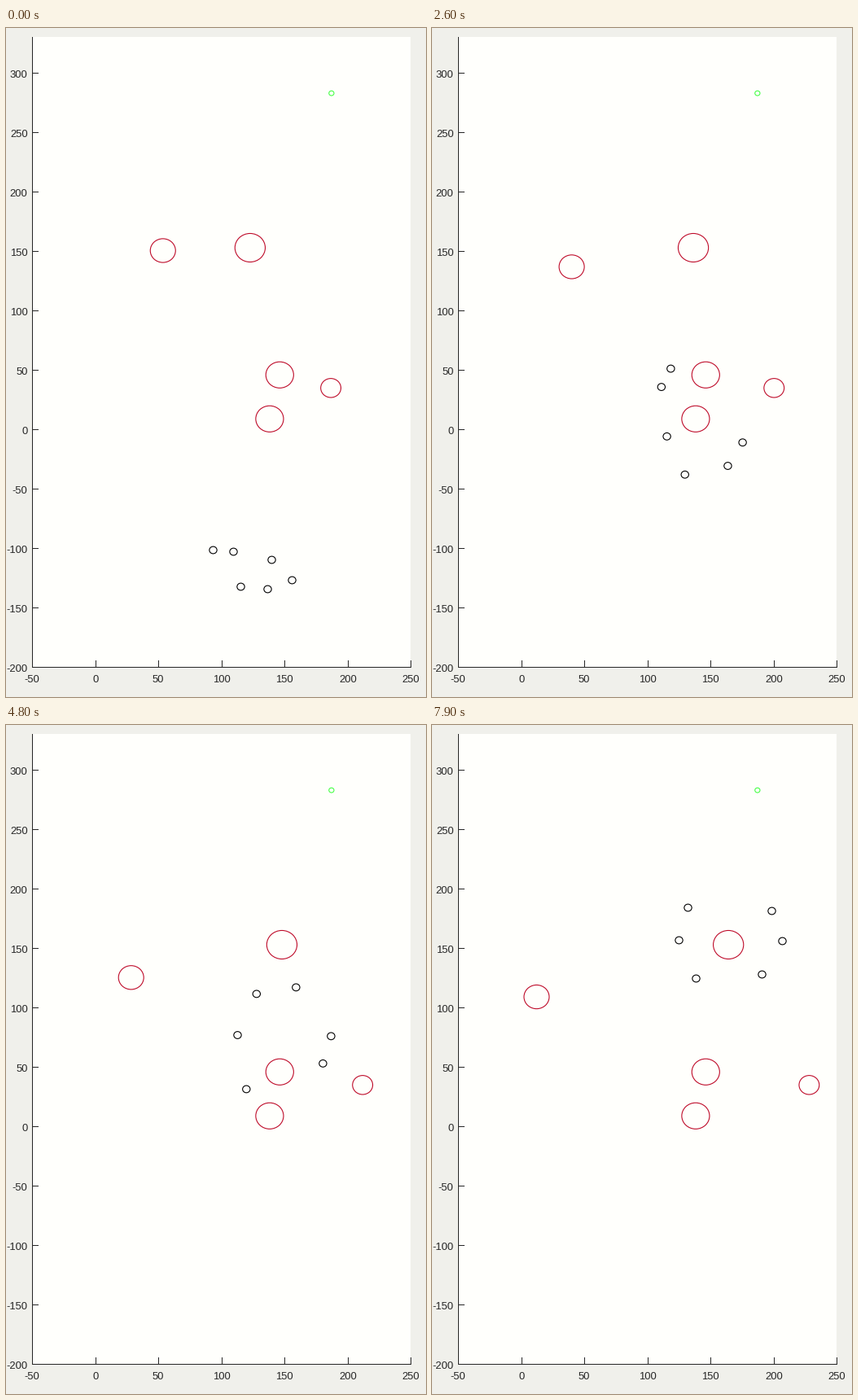
Write a matplotlib script that moves like this. It is 516 by 822 pixels and loops after 8 s.

```python
import matplotlib.pyplot as plt
import numpy as np
from matplotlib.animation import FuncAnimation
from matplotlib.patches import Ellipse, Rectangle

W, H, DPI = 516, 822, 100
FRAMES, STEP = 80, 100
PX = 72 / DPI
LEFT, TOP, WIDTH, HEIGHT = 32, 11, 465, 774
BOTTOM = TOP + HEIGHT
SCALE = np.array([WIDTH / 300, HEIGHT / 530])
INK, RED, GREEN = "#262626", "#be0a28", "#46ff46"

plt.rcParams["font.family"] = "Liberation Sans"
fig = plt.figure(figsize=(W / DPI, H / DPI), dpi=DPI, facecolor="#f0f0eb")
ax = fig.add_axes([0, 0, 1, 1])
ax.set(xlim=(0, W), ylim=(H, 0))
ax.axis("off")


def to_px(x, y):
    return np.array([LEFT + 0.5 + (x + 50) * SCALE[0],
                     BOTTOM + 0.5 - (y + 200) * SCALE[1]])


def bar(x, y, w, h):
    """Crisp axis line made of whole pixels."""
    ax.add_patch(Rectangle((x, y), w, h, fc=INK, ec="none",
                           antialiased=False, zorder=2))


def label(x, y, value, ha):
    ax.text(x, y, str(value), size=13 * PX, color=INK,
            ha=ha, va="center_baseline")


def ring(center, r, color):
    return ax.add_patch(Ellipse(center, *(2 * r * SCALE), fill=False,
                                ec=color, lw=1.1 * PX, zorder=3))


# Plot area, axis lines, ticks and labels
ax.add_patch(Rectangle((LEFT, TOP), WIDTH, HEIGHT, fc="#fffffc", ec="none"))
bar(LEFT, TOP, 1, HEIGHT + 1)
bar(LEFT, BOTTOM, WIDTH + 1, 1)
for v in range(-200, 301, 50):
    y = int(to_px(0, v)[1])
    bar(LEFT, y, 8, 1)
    label(26.5, y + 1.5, v, "right")
for v in range(-50, 251, 50):
    x = int(to_px(v, 0)[0])
    bar(x, BOTTOM - 8, 1, 8)
    label(x, BOTTOM + 14.5, v, "center")

# Obstacles drift at one speed: x, y, radius, direction
SPEED = 0.525
OBSTACLES = [
    (53.4, 150.6, 10, -1, -1),
    (122.5, 153, 12, 1, 0),
    (146, 46, 11, 0, 0),
    (186.5, 35, 8, 1, 0),
    (138, 9, 11, 0, 0),
]
ring(to_px(187, 283), 2, GREEN)
obstacles = [ring(to_px(x, y), r, RED) for x, y, r, _, _ in OBSTACLES]

# Each agent follows a smooth curve through a few points
KEYS = np.array([0, 17, 36, 57, 79])
PATHS = np.array([
    [(254, 641), (270, 488), (323, 356), (378, 303), (417, 228)],
    [(279, 643), (276, 509), (291, 375), (317, 303), (314, 224)],
    [(326, 653), (306, 550), (273, 449), (286, 400), (324, 311)],
    [(351, 678), (372, 561), (390, 454), (406, 334), (430, 265)],
    [(288, 686), (304, 585), (312, 510), (286, 400), (324, 311)],
    [(321, 689), (346, 588), (380, 483), (393, 371), (405, 306)],
]) + 0.5
PATHS[2, 3:] = (296.5, 335), (303.5, 264.5)
SLOPES = np.gradient(PATHS, KEYS, axis=1)
MARGIN = 10
agents = [ring(p[0], 3, "black") for p in PATHS]


def agent_positions(t):
    k = min(np.searchsorted(KEYS, t, side="right") - 1, len(KEYS) - 2)
    h = KEYS[k + 1] - KEYS[k]
    u = (t - KEYS[k]) / h
    ease = u * u * (3 - 2 * u)
    return (PATHS[:, k] * (1 - ease) + PATHS[:, k + 1] * ease
            + h * u * (1 - u) ** 2 * SLOPES[:, k]
            - h * u * u * (1 - u) * SLOPES[:, k + 1])


def push_out(pos, center, r):
    """Keep an agent clear of an obstacle."""
    gap = (pos - center) / SCALE
    dist = np.hypot(*gap)
    if dist >= r + MARGIN:
        return pos
    return center + gap / dist * (r + MARGIN) * SCALE


def update(t):
    d = SPEED * t
    positions = agent_positions(t)
    for patch, (x, y, r, vx, vy) in zip(obstacles, OBSTACLES):
        center = to_px(x + vx * d, y + vy * d)
        patch.set_center(center)
        positions = [push_out(p, center, r) for p in positions]
    for patch, pos in zip(agents, positions):
        patch.set_center(pos)
    return obstacles + agents


anim = FuncAnimation(fig, update, frames=FRAMES, interval=STEP,
                     repeat=True, repeat_delay=0, blit=False)
plt.show()
```
